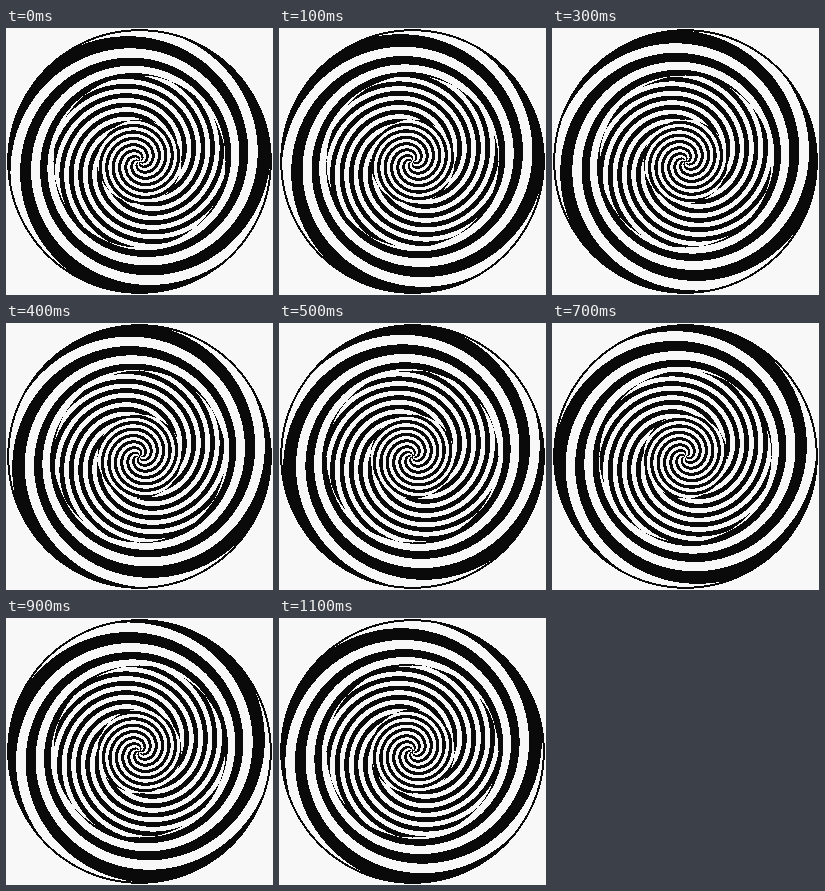
Recreate the animation shown at these times as an HTML page with a canvas. Size 267x267 px, loop 1.2 s.

```html
<!DOCTYPE html>
<html lang="en">
<head>
<meta charset="utf-8">
<title>Turning spiral</title>
<style>
html, body { margin: 0; width: 100%; height: 100%; overflow: hidden; background: #f8f8f8; }
canvas { display: block; width: 267px; height: 267px; }
</style>
</head>
<body>
<canvas id="stage" width="267" height="267"></canvas>
<script>
const SIZE = 267, MID = 133.5, RADIUS = 132.3, RIM = 2;
const LOOP = 1200, STEPS = 12, SYMMETRY = 3;
const INK = 10, PAPER = 248, BACK = 248;

// Three nested rings, each a spiral with its own arms and pitch.
const outer = {
  arms: 3,
  count: r => (21.5 - Math.sqrt(Math.max(0, 462.25 - 10 * (118.3 - r)))) / 5,
  half: r => 0.24 + Math.max(0, r - 100) * 0.002
};
const middle = { arms: 9, count: r => 1.76 + (86 - r) / 9.6, half: () => 0.25 };
const inner = { arms: 6, count: r => (42 - r) / 6.6, half: () => 0.25 };
const ringAt = r => r > 86 ? outer : r > 42 ? middle : inner;

const ctx = document.getElementById('stage').getContext('2d');
const image = ctx.createImageData(SIZE, SIZE);
const cells = [];

for (let y = 0; y < SIZE; y++) {
  for (let x = 0; x < SIZE; x++) {
    const dx = x + 0.5 - MID, dy = y + 0.5 - MID;
    const r = Math.hypot(dx, dy);
    const turn = Math.atan2(dx, -dy) / (2 * Math.PI);
    const ring = ringAt(r);
    cells.push({
      r, arms: ring.arms, half: ring.half(r),
      phase: ring.count(r) - ring.arms * turn
    });
  }
}

function shade(cell, spin) {
  if (cell.r > RADIUS) return BACK;
  if (cell.r > RADIUS - RIM) return INK;
  const p = cell.phase + cell.arms * spin;
  return Math.abs(p - Math.round(p)) < cell.half ? INK : PAPER;
}

function draw(step) {
  const px = image.data;
  const spin = step / STEPS / SYMMETRY;
  cells.forEach((cell, i) => {
    const k = i * 4;
    px[k] = px[k + 1] = px[k + 2] = shade(cell, spin);
    px[k + 3] = 255;
  });
  ctx.putImageData(image, 0, 0);
}

const start = performance.now();
let last = -1;
function tick() {
  const t = (performance.now() - start) % LOOP;
  const step = Math.floor(t / LOOP * STEPS);
  if (step !== last) draw(last = step);
  requestAnimationFrame(tick);
}
tick();
</script>
</body>
</html>
```
